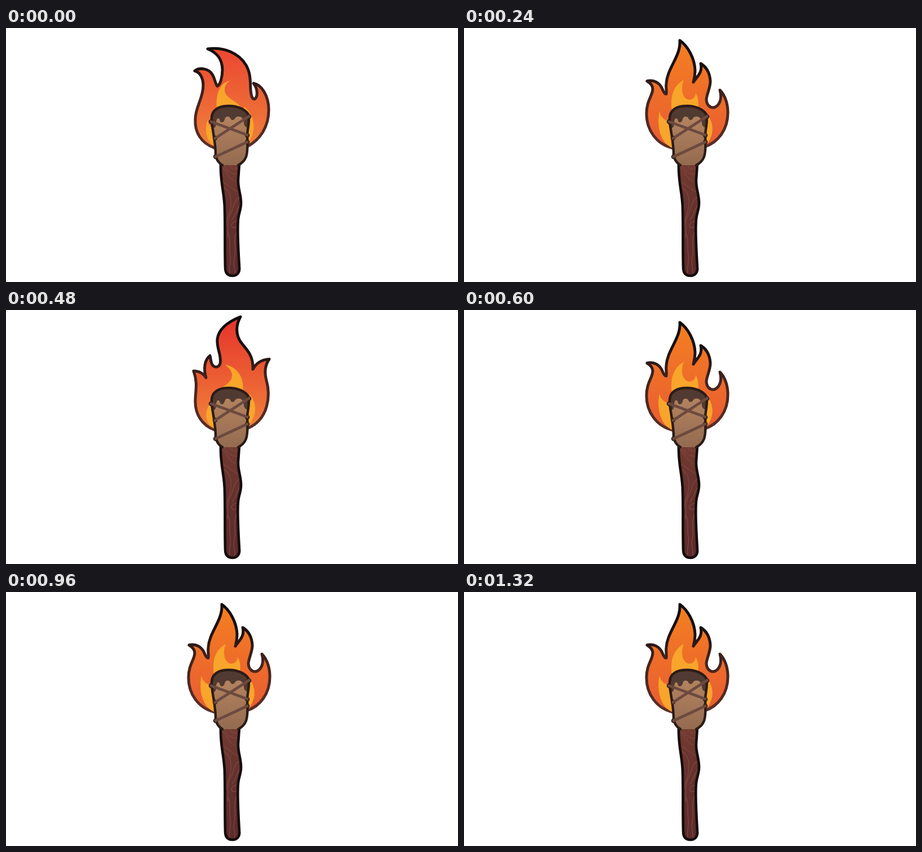
Recreate the animation shown at these times as an HTML page. Size 800 by 450 pixels, loop 1.44 s.

```html
<!DOCTYPE html>
<html lang="en">
<head>
<meta charset="utf-8">
<title>Torch</title>
<style>
  html, body { margin: 0; width: 100%; height: 100%; overflow: hidden; background: #fff; }
  svg { display: block; width: 100vw; height: 100vh; }
</style>
</head>
<body>
<svg viewBox="0 0 800 450" fill="none" stroke-linecap="round" stroke-linejoin="round">
  <defs>
    <linearGradient id="edge" gradientUnits="userSpaceOnUse" x1="0" y1="10" x2="0" y2="213">
      <stop offset="0" stop-color="#0d0a0a"/>
      <stop offset=".3" stop-color="#1c1211"/>
      <stop offset=".55" stop-color="#43241f"/>
      <stop offset="1" stop-color="#5a2f27"/>
    </linearGradient>
    <linearGradient id="heat" gradientUnits="userSpaceOnUse" x1="0" y1="15" x2="0" y2="213">
      <stop id="hot"/>
      <stop id="low" offset="1"/>
    </linearGradient>
    <linearGradient id="wrap" x1="0" y1="0" x2="0" y2="1">
      <stop offset="0" stop-color="#ba8862"/>
      <stop offset="1" stop-color="#946b50"/>
    </linearGradient>
    <linearGradient id="wood" x1="0" y1="0" x2="0" y2="1">
      <stop offset="0" stop-color="#743b31"/>
      <stop offset=".35" stop-color="#66322d"/>
      <stop offset="1" stop-color="#5b2a2a"/>
    </linearGradient>
    <path id="stickShape" d="M380 240C379 276 387 292 387 322C388 354 387 390 388 424C388 435 393 439 401 439C409 439 414 433 413 424C411 392 409 358 411 338C412 328 416 322 416 310C416 294 410 284 411 268L413 240Z"/>
    <path id="headShape" d="M383 243C376 239 372 234 371 224C371 208 368 193 366 180C364 168 362 157 367 149C373 140 384 138 394 138C410 138 423 144 429 153C432 160 428 177 427 188C427 202 429 216 425 228C422 236 417 240 411 243"/>
    <clipPath id="headClip"><use href="#headShape"/></clipPath>
    <clipPath id="stickClip"><use href="#stickShape"/></clipPath>
  </defs>

  <g id="flame">
    <path id="body" fill="url(#heat)" stroke="url(#edge)" stroke-width="5"/>
    <path id="core" fill="#f8a52b"/>
  </g>

  <g id="stick">
    <use href="#stickShape" fill="url(#wood)"/>
    <g clip-path="url(#stickClip)" stroke="#7a443b" stroke-width="1.5">
      <path d="M381 246C390 250 392 266 406 272M386 243C391 254 400 260 412 259M396 243C398 250 404 252 412 248"/>
      <path d="M383 272C394 278 402 288 415 292M384 282C396 287 399 300 398 314C397 330 390 334 390 350"/>
      <path d="M413 300C403 304 404 318 396 332C391 342 394 354 392 370M416 312C408 318 408 330 400 340"/>
      <path d="M412 342C402 342 397 348 400 352C403 356 408 352 412 350M392 362C399 374 394 386 397 402C399 414 394 422 396 434"/>
      <path d="M408 362C401 378 408 390 404 406C401 418 406 424 405 434"/>
    </g>
    <use href="#stickShape" stroke="#160c0c" stroke-width="4.600"/>
  </g>

  <g id="head">
    <use href="#headShape" fill="url(#wrap)"/>
    <path clip-path="url(#headClip)" fill="#513a31" d="M360 135H433V176C427 178 421 175 421 168C421 161 416 156 410 157C404 158 406 163 401 163C396 163 399 157 392 157C385 157 389 167 382 167C377 167 380 160 375 160C370 162 374 177 368 177L360 174Z"/>
    <use href="#headShape" stroke="#2b1c17" stroke-width="4.400"/>
    <g id="knots" stroke="#2f1f1a" stroke-width="8.500"/>
    <path stroke="#6c4a40" stroke-width="5" d="M363 166L427 189.500M370 195.500L430 156.500M371 228L427 202"/>
  </g>
</svg>
<script>
const STEP = 120;
const get = id => document.getElementById(id);

const leanLeft = {
  hot: "#ea4030", low: "#f0813a",
  body: "M370 213C345 204 334 185 335 162C335 140 349 125 349 102C349 88 343 78 334 76C343 69 359 72 365 82C370 90 370 98 374 103C380 100 383 85 383 74C383 55 372 43 357 37C385 33 412 44 425 66C434 82 432 98 433 110C434 122 436 126 440 126C446 122 446 108 438 98C452 100 465 120 465 145C465 175 450 198 427 210Z",
  core: "M397 93C380 97 371 112 373 143H417C412 130 387 125 387 110C387 102 391 97 397 93ZM357 162C350 182 356 203 370 210V178C362 177 358 172 357 162ZM421 139C440 153 446 184 427 205V165Z"
};
const leanRight = {
  hot: "#e6342b", low: "#f0833a",
  body: "M370 213C346 204 335 184 335 162C335 144 340 130 332 108C342 108 350 113 354 120C349 102 352 88 361 81C363 88 362 100 372 101C380 100 380 92 379 84C378 74 373 65 374 52C376 33 395 20 415 12C407 26 406 42 415 56C424 69 438 78 437 105C441 97 450 88 466 87C458 98 457 110 461 125C468 150 466 194 427 210Z",
  core: "M388 97C407 100 423 118 419 145H378C380 134 400 132 400 115C400 108 394 102 388 97ZM365 162C350 175 350 202 370 211V180ZM431 149C444 164 446 187 427 207V170C430 164 432 157 431 149Z"
};
const upright = {
  hot: "#f4811f", low: "#e95b33",
  body: "M370 213C340 206 323 180 323 152C323 128 334 120 334 108C334 101 329 97 324 94C337 91 347 98 351 108C353 113 355 117 358 117C359 112 357 106 358 98C360 70 384 50 382 22C396 32 408 53 409 75C409 85 407 92 406 96C411 87 423 80 419 63C429 69 435 80 436 94C436 106 430 116 429 126C429 136 435 141 441 141C450 140 458 128 453 110C463 120 467 136 467 150C467 180 450 202 427 210Z",
  core: "M389 92C373 101 364 117 368 147H413C416 135 415 123 410 115C410 122 405 127 399 127C388 126 382 110 389 92ZM346 148C341 172 346 204 370 213V166C358 166 348 160 346 148ZM427 150C444 165 444 192 427 209Z"
};
const poses = [leanLeft, leanRight, upright];

const ends = [[363, 166], [427, 190], [370, 195], [430, 157], [371, 228], [427, 202]];
get("knots").innerHTML = ends.map(([x, y]) => `<path d="M${x} ${y}h.01"/>`).join("");

function draw(time) {
  const pose = poses[Math.floor(time / STEP) % poses.length];
  get("body").setAttribute("d", pose.body);
  get("core").setAttribute("d", pose.core);
  get("hot").setAttribute("stop-color", pose.hot);
  get("low").setAttribute("stop-color", pose.low);
}

const start = performance.now();
function tick() {
  draw(performance.now() - start);
  requestAnimationFrame(tick);
}
tick();
</script>
</body>
</html>
```
